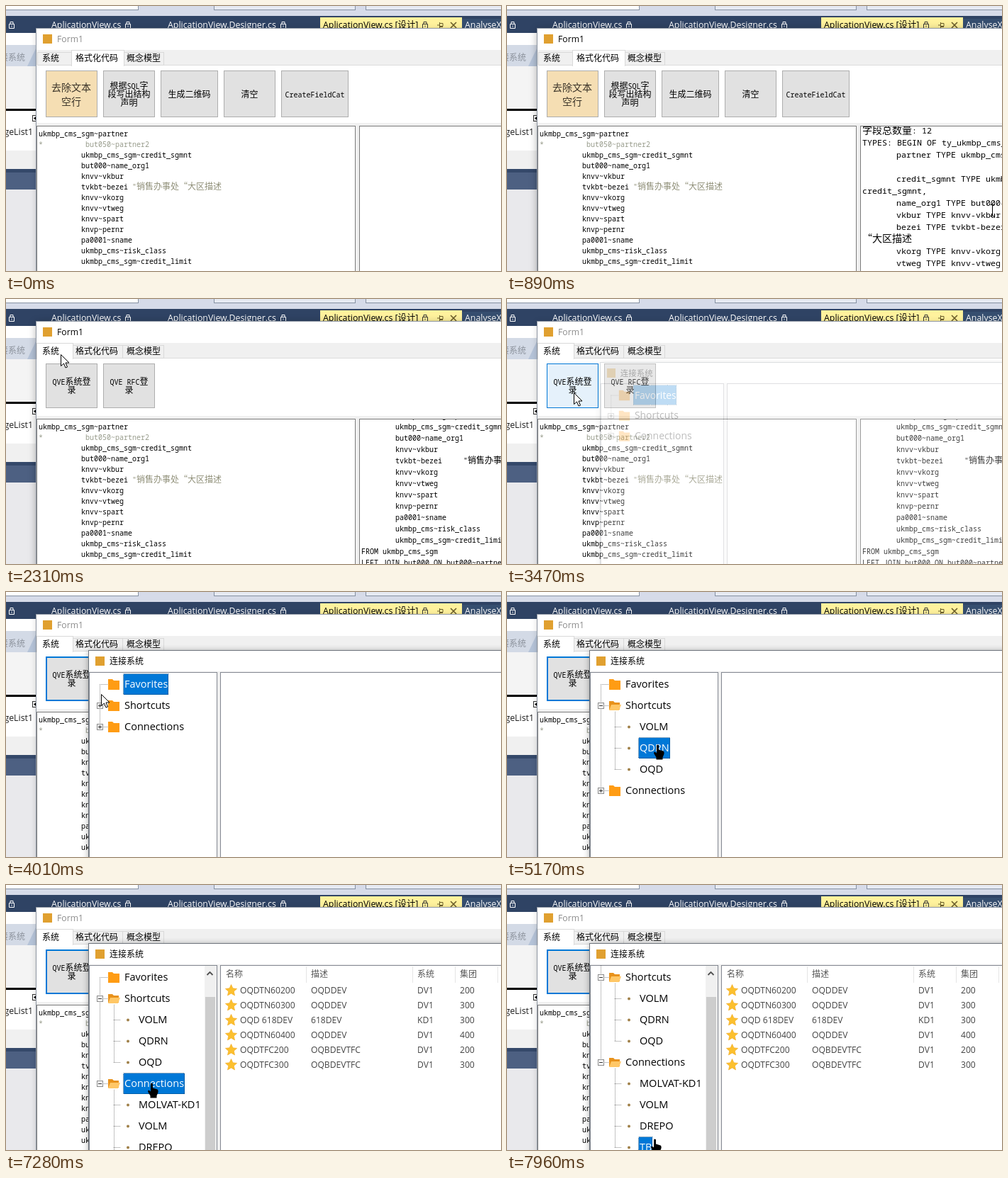
An HTML page for the animation above (8 s loop, 698 by 374 pixels).

```html
<!DOCTYPE html>
<html lang="zh">
<head>
<meta charset="utf-8">
<title>Form1</title>
<style>
  html, body { margin: 0; width: 100%; height: 100%; overflow: hidden; background: #f0f0f0; }
  svg { display: block; width: 698px; height: 374px; }
  text { font-family: "Open Sans", "Noto Sans CJK SC", "Noto Sans CJK", sans-serif; white-space: pre; }
  .song { font-family: "Noto Sans CJK SC", "Noto Sans CJK", sans-serif; }
  .mono { font-family: "Noto Sans Mono", "DejaVu Sans Mono", monospace; }
  .crisp { shape-rendering: crispEdges; }
  .dots { stroke: #8a8a8a; stroke-dasharray: 1 1; fill: none; }
  #frame { filter: drop-shadow(0 3px 6px rgba(0, 0, 0, .35)); }
  #dialogFrame { filter: drop-shadow(0 2px 5px rgba(0, 0, 0, .4)); }
</style>
</head>
<body>
<svg id="stage" viewBox="0 0 698 374" xmlns="http://www.w3.org/2000/svg"></svg>
<script>
const LOOP = 8000;
const BLUE = '#0078d7';

// ---- drawing helpers; text y is the middle of the line ----
const rect = (x, y, w, h, fill, extra = '') =>
  `<rect class="crisp" x="${x}" y="${y}" width="${w}" height="${h}" fill="${fill}" ${extra}/>`;
const box = (x, y, w, h, fill, stroke, extra = '') =>
  rect(x + .5, y + .5, w - 1, h - 1, fill, `stroke="${stroke}" ${extra}`);
const path = (d, fill, stroke = 'none', extra = '') =>
  `<path d="${d}" fill="${fill}" ${stroke ? `stroke="${stroke}"` : ''} ${extra}/>`;
const safe = s => s.replace(/&/g, '&amp;').replace(/</g, '&lt;');
const text = (x, y, s, size, fill = '#000', extra = '') =>
  `<text x="${x}" y="${y + size * .36}" font-size="${size}" fill="${fill}" ${extra}>${safe(s)}</text>`;
// Bitmap style text: a Latin cell is half as wide as a Chinese one.
const song = (x, y, s, size = 12, fill = '#000', extra = '') => {
  const runs = safe(s).replace(/[\x20-\x7e]+/g,
    run => `<tspan class="mono" font-size="${size / 1.2}">${run}</tspan>`);
  return `<text class="song" x="${x}" y="${y + size * .36}" font-size="${size}" fill="${fill}" ${extra}>${runs}</text>`;
};
const during = (from, to, body) => `<g data-from="${from}" data-to="${to}">${body}</g>`;

const lock = (x, color) =>
  path(`M${x - 3.5} 25.5h7v6h-7zM${x - 2} 25.5v-3h4v3M${x} 27.5v2`, 'none', color);

function backdrop() {
  return rect(0, 0, 698, 14, '#d6dbe9') +
    box(-1, -8, 188, 14, '#fff', '#8591a2') + box(293, -8, 200, 14, '#e6eaf3', '#8591a2') +
    box(507, -8, 200, 14, '#e6eaf3', '#8591a2') +
    rect(0, 14, 698, 24, '#2f4364') +
    rect(643, 18, 55, 20, '#364e6f') + rect(443, 16, 200, 22, '#fff29d') +
    text(64, 27, 'AplicationView.cs', 12.36, '#fff') +
    text(228, 27, 'AplicationView.Designer.cs', 12.36, '#fff') +
    text(447, 27, 'AplicationView.cs [设计]', 12.36) +
    text(647, 27, 'AnalyseX', 12.36, '#fff') +
    lock(8, '#fff') + lock(172, '#fff') + lock(391, '#fff') + lock(591, '#333') +
    path('M608 27h3M611.5 23v8M612 24.5h4v4h-4M612 29.5h4', 'none', '#6b5d2a') +
    path('M627 23l8 8M635 23l-8 8', 'none', '#6b5d2a', 'stroke-width="1.6"') +
    rect(0, 38, 43, 196, '#fff') +
    rect(0, 55, 43, 30, '#d3dae6') + path('M43 55V85H30L43 58Z', '#b5c3d8') +
    song(-21, 73, '连接系统', 12, '#8c929c') +
    rect(0, 85, 43, 60, '#f4f4f4') + rect(0, 145, 43, 3, '#000') +
    box(37, 154, 8, 9, '#fff', '#333') + path('M42 156l-3 2.5l3 2.5z', '#000') +
    text(38, 178, 'imageList1', 12.36, '#1e1e1e', 'text-anchor="end"') +
    rect(0, 204, 43, 26, '#f0f0f0') + rect(0, 230, 43, 5, '#35496a') +
    rect(0, 235, 43, 24, '#4d6082') + rect(0, 259, 43, 115, '#e9e9ec');
}

function tab(x, w, label, tx, chosen) {
  return box(x, chosen ? 62 : 65, w, chosen ? 23 : 19, chosen ? '#fff' : '#f0f0f0', '#d9d9d9') +
    (chosen ? rect(x + 1, 83, w - 2, 3, '#fff') : '') + song(tx, 74, label);
}

function button(x, w, h, lines, id = '') {
  const first = 91 + h / 2 + .5 - (lines.length - 1) * 6;
  return box(x, 91, w, h, '#e1e1e1', '#adadad', id) +
    lines.map((s, i) => song(x + w / 2, first + i * 12, s, 12, '#000', 'text-anchor="middle"')).join('');
}

const formatTab = () =>
  tab(44, 49, '系统', 51) + tab(166, 57, '概念模型', 170) + tab(92, 75, '格式化代码', 98, true) +
  box(56, 91, 73, 66, '#f5deb3', '#adadad') +
  song(64, 115, '去除文本', 14, '#3a3328') + song(78, 135, '空行', 14, '#3a3328') +
  button(137, 73, 66, ['根据SQL字', '段写出结构', '声明']) +
  button(218, 81, 66, ['生成二维码']) + button(307, 73, 66, ['清空']) +
  button(388, 95, 66, ['CreateFieldCat']);

const systemTab = () =>
  tab(94, 71, '格式化代码', 98) + tab(164, 59, '概念模型', 170) + tab(43, 52, '系统', 51, true) +
  button(56, 73, 63, ['QVE系统登', '录'], 'id="login"') +
  button(137, 73, 63, ['QVE RFC登', '录']);

const fields = ['ukmbp_cms_sgm~credit_sgmnt', 'but000~name_org1', 'knvv~vkbur', 'tvkbt~bezei',
  'knvv~vkorg', 'knvv~vtweg', 'knvv~spart', 'knvp~pernr', 'pa0001~sname',
  'ukmbp_cms~risk_class', 'ukmbp_cms_sgm~credit_limit'];

function leftCode() {
  const rows = fields.map((f, i) => {
    const y = 209.7 + i * 14.95;
    const note = f.endsWith('bezei') ? song(178, y, '"销售办事处“大区描述', 12, '#8f8f78') : '';
    return song(106, y, f) + note;
  });
  return song(46, 179.8, 'ukmbp_cms_sgm~partner') +
    song(46, 194.8, '*          but050~partner2', 12, '#989c8c') + rows.join('');
}

function rightCode() {
  const typed = f => `${f.split('~')[1]} TYPE ${f.replace('~', '-')},`;
  const types = ['字段总数量: 12', 'TYPES: BEGIN OF ty_ukmbp_cms_sgm,', '\t' + typed('ukmbp_cms_sgm~partner'), ''];
  for (const f of fields) {
    const line = '\t' + typed(f);
    if (f.endsWith('sgmnt')) types.push('\tcredit_sgmnt TYPE ukmbp_cms_sgm-', 'credit_sgmnt,');
    else if (f.endsWith('bezei')) types.push(line, '“大区描述');
    else types.push(line);
  }
  types.push('END OF ty_ukmbp_cms_sgm.', '');
  const query = ['SELECT', '\tukmbp_cms_sgm~partner',
    ...fields.map(f => '\t' + f + (f.endsWith('bezei') ? '     "销售办事处' : '')),
    'FROM ukmbp_cms_sgm', 'LEFT JOIN but000 ON but000~partner = ukmbp_cms_sgm~partner'];
  const put = (line, y, size) => song(line[0] === '\t' ? 549 : 501, y, line.trimStart(), size);
  const half = types.length * 17;
  return types.map((s, i) => put(s, 180 + i * 17, 14)).join('') +
    query.map((s, i) => put(s, 179.5 + half + i * 16, 12)).join('');
}
const QUERY_SCROLL = 19 * 17 + 32 - .5;

function form() {
  return rect(43, 31, 700, 400, '#fff', 'id="frame"') + box(42, 31, 720, 400, '#fff', '#8f97a3') +
    rect(52, 40, 13, 13, '#e0a030') + text(72, 47, 'Form1', 12.2, '#000', 'id="caption"') +
    rect(43, 62, 655, 312, '#f0f0f0') + rect(43, 83, 655, 82, '#fff') +
    rect(222, 83, 476, 1, '#dcdcdc') +
    during(0, 2310, formatTab()) + during(2310, LOOP, systemTab()) +
    during(2140, 2310, box(44, 65, 49, 19, '#d8eaf9', '#d9d9d9') + song(51, 74, '系统')) +
    box(43, 169, 450, 240, '#fff', '#7a7a7a') + leftCode() +
    box(498, 169, 260, 240, '#fff', '#7a7a7a') +
    `<g clip-path="url(#rightPane)">${during(100, LOOP, `<g id="output">${rightCode()}</g>`)}</g>`;
}

// ---- connection dialog ----
const shortcuts = ['VOLM', 'QDRN', 'OQD'];
const links = ['MOLVAT-KD1', 'VOLM', 'DREPO', 'TB'];

const folder = (y, open) => open
  ? path(`M144 ${y - 6}h6l2 2h7v10h-15z`, '#e8921c') + path(`M147 ${y - 1}h14l-3 8h-14z`, '#ffc766')
  : path(`M144 ${y - 7}h6l2 2h8v13h-16z`, '#ff9c14');
const expander = (y, open) => box(128, y - 4, 9, 9, '#fff', '#8a8a8a') +
  path(`M130 ${y + .5}h5` + (open ? '' : `M132.5 ${y - 2}v5`), 'none', '#333');
const dotted = d => path(d, 'none', '', 'class="dots"');

function treeRows(showShort, showLinks, scrolled) {
  let y = scrolled ? 100 : 130;
  let out = '', ends = y;
  const start = y;
  const label = (x, s) =>
    `<g class="row" data-label="${s}" data-x="${x}" data-y="${y}">${text(x, y, s, 14.5)}</g>`;
  const group = (name, kids, open) => {
    const top = ends = y;
    out += dotted(`M132 ${y + .5}h12`) + folder(y, open) + label(167, name);
    if (kids.length) out += expander(y, open);
    y += 30;
    if (!open) return;
    out += dotted(`M152.5 ${top + 9}V${y + 30 * (kids.length - 1)}`);
    for (const kid of kids) {
      out += dotted(`M152 ${y + .5}h10`) +
        `<circle cx="172" cy="${y + .5}" r="2" fill="#a08048"/>` + label(187, kid);
      y += 30;
    }
  };
  group('Favorites', [], false);
  group('Shortcuts', shortcuts, showShort);
  group('Connections', links, showLinks);
  const bar = rect(280, 114, 17, 260, '#f0f0f0') + rect(281, 158, 14, 216, '#cdcdcd') +
    path('M283.5 127l4-4 4 4', 'none', '#505050', 'stroke-width="1.8"');
  return dotted(`M132.5 ${start}V${ends}`) + out + (showLinks ? bar : '');
}

function star(y) {
  const points = Array.from({ length: 10 }, (_, i) => {
    const r = i % 2 ? 4 : 8.5, a = Math.PI * (i / 5 - .5);
    return `${(317.5 + r * Math.cos(a)).toFixed(1)},${(y + r * Math.sin(a)).toFixed(1)}`;
  });
  return `<polygon points="${points.join(' ')}" fill="#fcc02e" stroke="#f0a51c" stroke-width=".6"/>`;
}
function table(rows) {
  const cols = [330, 430, 580, 640];
  const head = ['名称', '描述', '系统', '集团'];
  return head.map((s, i) => song(i ? cols[i] : 310, 126, s, 12, '#555') +
      rect([423, 573, 633, 693][i], 115, 1, 23, '#e5e5e5')).join('') +
    rows.map((row, r) => {
      const y = 149 + r * 21;
      return star(y) + row.split('|').map((s, i) => text(cols[i], y, s, 12.1, '#444')).join('');
    }).join('');
}
const qdrnRows = ['QDRTN60100|QDRDEV|DV2|100', 'QDRTN60200|QDRDEV|DV2|200', 'QDRTN60300|QDRQAS|QS2|300',
  'QDRTN60800|QDRPRD|PR2|800', 'QDRTFC200|QDRDEVTFC|DV2|200'];
const oqdRows = ['OQDTN60200|OQDDEV|DV1|200', 'OQDTN60300|OQDDEV|DV1|300', 'OQD 618DEV|618DEV|KD1|300',
  'OQDTN60400|OQDDEV|DV1|400', 'OQDTFC200|OQBDEVTFC|DV1|200', 'OQDTFC300|OQBDEVTFC|DV1|300'];

function dialog() {
  return `<g id="dialog">` +
    rect(117, 82, 750, 376, '#fff', 'id="dialogFrame"') + box(116, 82, 752, 377, '#fff', '#6f757d') +
    rect(126, 91, 13, 13, '#e0a030') + song(146, 98, '连接系统') +
    rect(117, 112, 750, 346, '#f0f0f0') +
    box(117, 113, 181, 340, '#fff', '#828790') + box(302, 113, 560, 340, '#fff', '#828790') +
    `<g id="tree" clip-path="url(#treePane)"></g>` +
    during(5400, 6410, table(qdrnRows)) + during(6410, LOOP, table(oqdRows)) + `</g>`;
}

const cursors =
  path('M-3 -8H-1Q0 -8 0 -7V7Q0 8 -1 8H-3M3 -8H1Q0 -8 0 -7M0 7Q0 8 1 8H3', 'none', '#000', 'id="beam"') +
  path('M0 0V16L4 12.5 6.5 18.5 9 17.5 6.5 11.5H11.5Z', '#fff', '#000', 'id="arrow"') +
  path('M-1.5 1Q0 -1 1.5 1V7L8 9Q9.5 10 9 13L7 18V21H-2V18L-5 13Q-6 10.5 -4 10L-1.5 12Z', '#000', 'none', 'id="finger"');

const stage = document.getElementById('stage');
stage.innerHTML = `<defs>
  <clipPath id="rightPane"><rect x="499" y="170" width="199" height="204"/></clipPath>
  <clipPath id="treePane"><rect x="118" y="114" width="179" height="260"/></clipPath></defs>` +
  backdrop() + form() + dialog() + `<g id="cursor">${cursors}</g>`;

// ---- motion ----
// Each move: start, end, number of hard steps, then the values reached.
function track(t, start, moves) {
  let now = start;
  for (const [from, to, steps, ...goal] of moves) {
    if (t < from) break;
    const k = Math.min(1, (Math.floor((t - from) / (to - from) * (steps - 1) + 1e-6) + 1) / steps);
    now = now.map((v, i) => v + (goal[i] - v) * k);
  }
  return now;
}
const pick = (t, list) => list.find(([until]) => t < until)[1];

const pointerMoves = [
  [100, 890, 11, 684, 288], [1270, 1500, 4, 316, 192], [1670, 2140, 7, 77, 78],
  [2386, 2530, 3, 94, 132], [3930, 4250, 5, 193, 161], [4650, 4810, 3, 210, 195],
  [5030, 5170, 3, 212, 215], [5640, 5870, 4, 336, 228], [5940, 6180, 4, 206, 249],
  [6487, 6640, 3, 202, 289], [6950, 7110, 3, 205, 279], [7660, 7960, 5, 208, 358]];
const scrollMoves = [[890, 891, 1, 5], [960, 1190, 4, QUERY_SCROLL]];
const selections = [[4250, 'Favorites'], [5170, 'Shortcuts'], [6180, 'QDRN'], [7110, 'OQD'],
  [7960, 'Connections'], [LOOP, 'TB']];
const loginLooks = [[2530, ['#e1e1e1', '#adadad', 1]], [3170, ['#e5f1fb', BLUE, 1]],
  [3320, ['#cce4f7', '#005499', 1]], [4010, ['#e5f1fb', BLUE, 1]], [LOOP, ['#e1e1e1', BLUE, 2]]];

const $ = id => document.getElementById(id);
const set = (id, attrs) => { for (const k in attrs) $(id).setAttribute(k, attrs[k]); };
const timed = [...document.querySelectorAll('[data-from]')];
let treeKey = '';

function updateTree(t) {
  const chosen = pick(t, selections);
  const state = [t >= 4480, t >= 7280, t >= 7350];
  const key = state + chosen;
  if (key === treeKey) return;
  treeKey = key;
  const tree = $('tree');
  tree.innerHTML = treeRows(...state);
  const row = tree.querySelector(`[data-label="${chosen}"]`);
  const label = row.querySelector('text');
  const width = Math.round(label.getComputedTextLength()) + 3;
  label.setAttribute('fill', '#fff');
  label.insertAdjacentHTML('beforebegin',
    box(row.dataset.x - 2, row.dataset.y - 15, width, 30, BLUE, '#00457c', 'stroke-dasharray="1 1"'));
}

function render(t) {
  for (const g of timed) g.style.display = t >= g.dataset.from && t < g.dataset.to ? '' : 'none';
  const active = t >= 100 && t < 3470;
  set('caption', { fill: active ? '#000' : '#8c8c8c' });
  $('frame').style.filter = active ? '' : 'drop-shadow(0 2px 4px rgba(0,0,0,.2))';

  const [fill, stroke, line] = pick(t, loginLooks);
  const inset = line / 2;
  set('login', { fill, stroke, 'stroke-width': line, x: 56 + inset, y: 91 + inset, width: 73 - line, height: 63 - line });

  set('output', { transform: `translate(0 ${-track(t, [0], scrollMoves)[0]})` });

  const [shown] = track(t, [0], [[3470, 3700, 4, 1]]);
  const size = .947 + .053 * shown;
  set('dialog', { opacity: shown, transform: `translate(492 270) scale(${size}) translate(-492 -270)` });
  updateTree(t);

  const [x, y] = track(t, [725, 345], pointerMoves);
  const shape = t < 1740 ? 'beam' : t < 4090 || x > 240 ? 'arrow' : 'finger';
  set('cursor', { transform: `translate(${Math.round(x) + .5} ${Math.round(y) + .5})` });
  for (const id of ['beam', 'arrow', 'finger']) $(id).style.display = id === shape ? '' : 'none';
}

const begin = performance.now();
function tick() {
  render((performance.now() - begin) % LOOP);
  requestAnimationFrame(tick);
}
tick();
</script>
</body>
</html>
```
